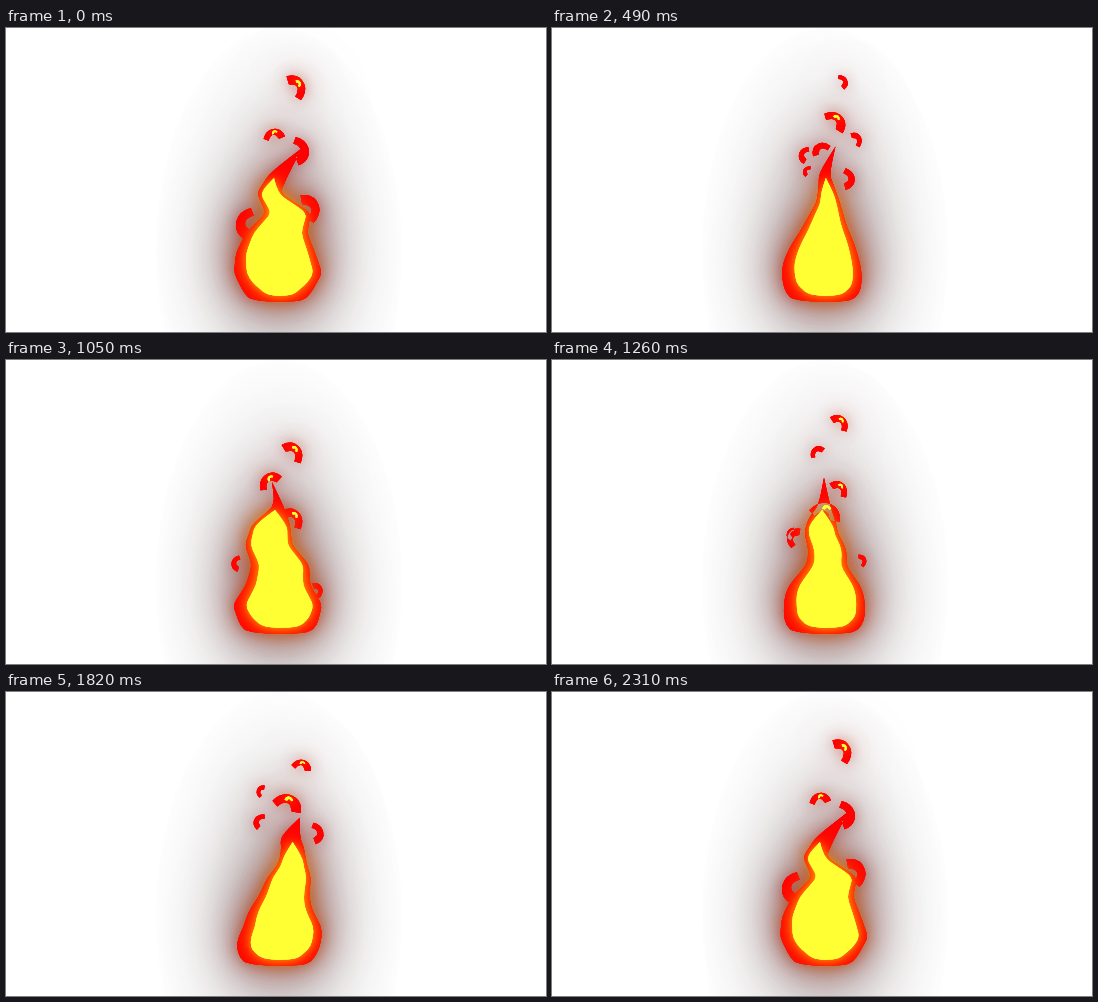
Write an HTML page with a canvas that moves like this. It is 540 px wide and 304 px high and loops after 2450 ms.

```html
<!DOCTYPE html>
<html lang="en">
<head>
<meta charset="utf-8">
<title>Flame</title>
<style>
html, body { margin: 0; width: 100%; height: 100%; overflow: hidden; background: #fff; }
canvas { display: block; width: 100%; height: 100%; }
</style>
</head>
<body>
<canvas id="stage" width="540" height="304"></canvas>
<script>
const ctx = document.getElementById('stage').getContext('2d');
const LOOP = 2450, STEP = 70, LAST = 2310;
const RISE = 0.14, LIFE = 760, LEAD = 200;   // px per ms, ms, ms
const BASE = 265, RUNG = 20, TOP = 6, MID = 272;

// Left and right edge on evenly spaced rungs above the base, and the tip.
const poses = [
  { t: 0, left: [238, 228, 230, 240, 260, 251, 264], right: [305, 316, 309, 301, 305, 274, 283], tip: [296, 120] },
  { t: 280, left: [235, 230, 241, 253, 269, 268, 264], right: [307, 309, 305, 295, 286, 280, 273], tip: [284, 112] },
  { t: 700, left: [233, 226, 232, 239, 254, 260, 270], right: [308, 313, 307, 300, 290, 290, 281], tip: [283, 125] },
  { t: 1050, left: [234, 227, 240, 246, 239, 246, 269], right: [311, 316, 304, 303, 286, 284, 277], tip: [266, 122] },
  { t: 1540, left: [234, 231, 240, 246, 272, 272, 264], right: [309, 315, 307, 302, 281, 288, 279], tip: [280, 112] },
  { t: 2030, left: [233, 227, 242, 249, 266, 273, 282], right: [309, 319, 317, 301, 301, 314, 304], tip: [304, 136] }
];
poses.push({ ...poses[0], t: LAST });

// Rising wisps: moment, x, y, sideways drift over a life, half length.
const wisps = [
  [0, 295, 122, -6, 14], [0, 305, 180, 0, 15], [0, 239, 195, 20, 16],
  [280, 282, 122, 6, 16], [280, 300, 180, -12, 13], [280, 266, 150, 10, 12], [280, 256, 172, -5, 7],
  [700, 260, 170, 6, 18],
  [1050, 288, 92, 2, 13], [1050, 288, 158, 0, 13], [1050, 230, 203, 31, 8], [1050, 312, 230, -5, 8],
  [1300, 275, 146, 30, 20], [1300, 242, 172, 18, 13],
  [1540, 275, 150, 18, 20], [1540, 254, 168, -3, 11], [1540, 303, 180, 23, 14],
  [2030, 292, 98, -2, 18], [2030, 266, 146, 4, 14]
];

const mix = (a, b, u) => a + (b - a) * u;
const clamp = (v, lo, hi) => Math.max(lo, Math.min(hi, v));
const noise = n => { const v = Math.sin(n * 127.1) * 43758.5; return v - Math.floor(v); };

function edge(list, rung) {
  const r = clamp(rung, 0, TOP), i = Math.min(TOP - 1, Math.floor(r));
  return mix(list[i], list[i + 1], r - i);
}

// Bulges travel upwards along the flanks while one pose turns into the next.
function flank(a, b, side, t) {
  const u = (t - a.t) / (b.t - a.t);
  return Array.from({ length: TOP * 2 + 1 }, (_, k) => {
    const rung = k / 2, lift = .5 * Math.sin(Math.PI * rung / TOP) * RISE / RUNG;
    const from = edge(a[side], rung - lift * (t - a.t));
    const to = edge(b[side], rung + lift * (b.t - t));
    return [mix(from, to, u), BASE - RUNG * rung];
  });
}

// Smooth curve through all points, sharp only at the tip.
function trace(path, left, tip, right, floor) {
  const run = pts => {
    for (let i = 1; i < pts.length - 1; i++) {
      const p = pts[i], q = pts[i + 1];
      path.quadraticCurveTo(p[0], p[1], (p[0] + q[0]) / 2, (p[1] + q[1]) / 2);
    }
    path.lineTo(...pts[pts.length - 1]);
  };
  const start = [MID, floor];
  path.moveTo(...start);
  run([start, [left[0][0] + 8, floor - 1], ...left, tip]);
  run([tip, ...right.slice().reverse(), [right[0][0] - 8, floor - 1], start]);
  path.closePath();
}

function body(t, red, hot) {
  let i = poses.length - 2;
  while (i > 0 && poses[i].t > t) i--;
  const a = poses[i], b = poses[i + 1], u = (t - a.t) / (b.t - a.t);
  const left = flank(a, b, 'left', t), right = flank(a, b, 'right', t);
  trace(red, left, [0, 1].map(d => mix(a.tip[d], b.tip[d], u)), right, 274);

  // The core follows the outer shape, closer to it higher up.
  const inset = (pts, wide, thin) => pts.slice(0, -2)
    .map(([x, y], k) => [x + mix(wide, thin, k / 10), Math.min(y, 260)]);
  const top = TOP * 2 - 1;
  trace(hot, inset(left, 15, 3), [(left[top][0] + right[top][0]) / 2, 150], inset(right, -10, -3), 268);
}

function crescent(path, x, y, s, turn, flip) {
  const c = Math.cos(turn) * s, n = Math.sin(turn) * s;
  const at = (px, py) => [x + px * flip * c - py * n, y + px * flip * n + py * c];
  path.moveTo(...at(-1, .45));
  path.quadraticCurveTo(...at(-.9, -.5), ...at(0, -.55));
  path.quadraticCurveTo(...at(.6, -.55), ...at(1, .1));
  path.lineTo(...at(.6, .4));
  path.quadraticCurveTo(...at(.2, -.2), ...at(-.2, .1));
  path.lineTo(...at(-.4, .5));
  path.closePath();
}

function embers(t, red, hot) {
  wisps.forEach(([born, x0, y0, drift, size], i) => {
    const age = (t - born + LEAD + LAST) % LAST - LEAD;
    if (age >= LIFE) return;
    const x = x0 + drift * age / LIFE, y = y0 - RISE * age;
    const s = size * (age < 0 ? 1 + age / LEAD : (1 - age / LIFE) ** .6);
    // Upright beside the flame, flat above it.
    const side = clamp((x0 - MID) / 22, -1, 1);
    const turn = side * 1.3 + age / 900 * (noise(i) - .5);
    crescent(red, x, y, s, turn, noise(i + 9) < .5 ? -1 : 1);
    if (s > 10 && Math.abs(side) < 1) crescent(hot, x + s * .1, y - s * .25, s * .28, turn, 1);
  });
}

function fill(path, color, shadow, blur) {
  ctx.save();
  ctx.fillStyle = color;
  if (shadow) {
    ctx.shadowColor = shadow;
    ctx.shadowBlur = blur;
  }
  ctx.fill(path);
  ctx.restore();
}

const haze = ctx.createRadialGradient(0, 0, 0, 0, 0, 1);
[[0, .24], [.35, .16], [.6, .075], [.8, .03], [1, .008]]
  .forEach(([r, a]) => haze.addColorStop(r, `rgba(40,10,10,${a})`));

function paint(t) {
  ctx.fillStyle = '#fff';
  ctx.fillRect(0, 0, 540, 304);
  ctx.save();
  ctx.translate(273, 222);
  ctx.scale(123, 222);
  ctx.fillStyle = haze;
  ctx.beginPath();
  ctx.arc(0, 0, 1, 0, 7);
  ctx.fill();
  ctx.restore();

  const red = new Path2D(), hot = new Path2D();
  body(t, red, hot);
  embers(t, red, hot);

  fill(red, '#f00', 'rgba(50,0,0,.42)', 74);
  fill(red, '#f00', 'rgba(130,0,0,.55)', 36);
  fill(red, '#f00', 'rgba(150,0,0,.4)', 14);
  fill(red, '#f00');
  fill(hot, '#ff3', 'rgba(255,140,0,.8)', 26);
  fill(hot, '#ff3', 'rgba(255,190,0,.8)', 10);
  fill(hot, '#ff3');
}

const start = performance.now();
let shown = -1;
function tick() {
  const now = (performance.now() - start) % LOOP;
  const t = Math.min(LAST, Math.floor(now / STEP) * STEP);
  if (t !== shown) paint(shown = t);
  requestAnimationFrame(tick);
}
tick();
</script>
</body>
</html>
```
